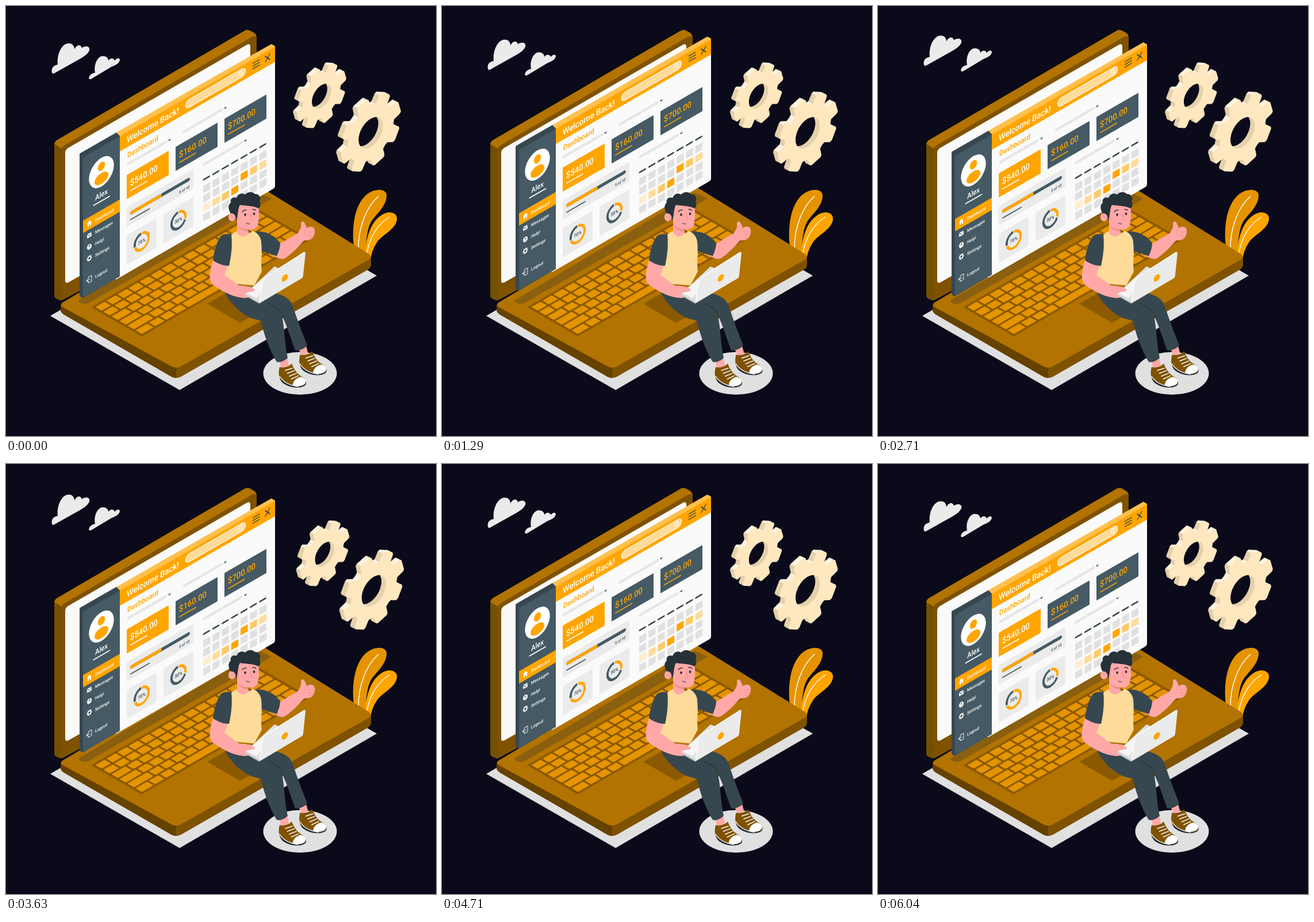
An HTML page that plays this animation: 748 by 748 pixels, repeating every 6080 ms.

```html
<!DOCTYPE html>
<html lang="en">
<head>
<meta charset="utf-8">
<title>Dashboard</title>
<style>
html, body { margin: 0; width: 100%; height: 100%; overflow: hidden; background: #0b0a1a; }
svg { display: block; width: 100vw; height: 100vh; }
text { font-family: Roboto, Inter, sans-serif; font-weight: 500; }
</style>
</head>
<body>
<svg id="stage" viewBox="0 0 748 748"></svg>
<script>
const NIGHT = '#0b0a1a', ORANGE = '#ffa500', SLATE = '#455a64', DARK = '#37474f', INK = '#263238';
const BROWN = '#b27300', BROWN_MID = '#8b5a00', BROWN_DARK = '#7f5200', BROWN_DEEP = '#664200';
const SKIN = '#ffa8a7', SKIN_DARK = '#f28f8f', GREY = '#e6e6e6', PAPER = '#fafafa';
const CREAM = '#ffe8bf', CREAM_LIGHT = '#fff3de', CREAM_DARK = '#e5d1ac';

const path = (d, fill) => `<path d="${d}" fill="${fill}"/>`;
const line = (d, color, w) =>
  `<path d="${d}" fill="none" stroke="${color}" stroke-width="${w}" stroke-linecap="round" stroke-linejoin="round"/>`;
const rect = (x, y, w, h, fill, r = 0) =>
  `<rect x="${x}" y="${y}" width="${w}" height="${h}" rx="${r}" fill="${fill}"/>`;
const oval = (x, y, rx, ry, fill) => `<ellipse cx="${x}" cy="${y}" rx="${rx}" ry="${ry}" fill="${fill}"/>`;
const group = (transform, body) => `<g transform="${transform}">${body}</g>`;
const layer = (id, body) => `<g id="${id}">${body}</g>`;
const times = (n, f) => Array.from({ length: n }, (_, i) => f(i)).join('');

// Text and round shapes on the upright plane keep their isometric proportions.
const iso = (x, y, body) => group(`translate(${x} ${y}) scale(.866 1)`, body);
const label = (x, y, size, fill, str, anchor = 'start') =>
  iso(x, y, `<text font-size="${size}" fill="${fill}" text-anchor="${anchor}">${str}</text>`);

function clouds() {
  return path('M80 116C78 108 83 103 90 102C88 86 96 65 109 65C116 65 119 70 119 75C123 67 130 66 132 73C138 68 147 70 145 77C143 84 132 90 125 94L84 117Q81 119 80 116Z', '#ebebeb') +
    path('M144 126C145 120 149 117 155 116C152 101 160 87 168 87C174 87 178 90 178 95C182 89 188 91 189 95C193 90 198 90 198 94C197 100 190 103 183 106L148 127Q145 128 144 126Z', '#ebebeb');
}

function plant() {
  return path('M606 428C600 385 606 350 624 331C640 315 664 317 662 331C661 349 645 361 636 374C628 386 626 410 625 436Z', '#e59400') +
    path('M624 438C625 405 634 378 650 366C664 354 682 358 680 372C677 389 656 397 646 410C640 419 636 428 634 440Z', ORANGE) +
    line('M613 426C612 384 628 348 648 331', '#fff', 1.4) +
    line('M627 436C631 402 648 378 667 367', '#fff', 1.4);
}

function lid() {
  return path('M84 241Q84 236 89 233L415 43Q420 40 425 43L432 47Q436 50 436 56V330L97 512Q92 512 88 509Q84 507 84 503Z', BROWN) +
    path('M84 240L97 248V512Q84 510 84 503Z', '#735000') +
    path('M97 512V250Q97 245 102 242L427 54Q436 49 436 58V325Z', BROWN_DARK) +
    path('M103 478V256Q103 250 108 247L418 68Q425 64 425 71V300L110 480Q103 484 103 478Z', PAPER);
}

function keyboard() {
  const first = [16, 16, 24, 28, 34, 20];
  const keys = times(6, r => {
    let out = '', x = 4, i = 0;
    while (x < 282) {
      let w = i === 0 ? first[r] : r === 5 && i === 4 ? 88 : 16;
      if (x + w > 270) w = 289 - x;
      out += rect(x, 3.5 + r * 14, w, 11, '#e59400', 1.2);
      x += w + 3.2;
      i++;
    }
    return out;
  });
  return group('matrix(1 -.577 1 .577 148 524)', rect(0, 0, 293, 88, BROWN_MID, 3) + keys);
}

function base() {
  return path('M95 520V529Q95 533 101 537L288 645Q296 649 304 645L629 459Q635 455 635 450V437L296 600Z', BROWN_DARK) +
    path('M95 520V529Q95 533 101 537L288 645Q292 647 296 647V610Z', BROWN_DEEP) +
    path('M98 516L432 318Q440 313 448 318L631 431Q638 437 630 442L304 627Q296 631 288 627L99 524Q93 520 98 516Z', BROWN) +
    path('M128 511L440 325L462 335L143 517Q136 520 129 516Q124 513 128 511Z', '#8a5f10') +
    keyboard() + path('M350 518L408 485L468 518L407 551Z', BROWN_MID);
}

function donut(x, share) {
  const arc = (from, size, color) =>
    `<circle r="14" fill="none" stroke="${color}" stroke-width="4.5" pathLength="100" stroke-dasharray="${size} 100" stroke-dashoffset="${-from}"/>`;
  return rect(x - 26, 406, 52, 51, '#ebebeb', 2.5) +
    iso(x, 431.5, group('rotate(-90)', arc(1, share - 2, ORANGE) + arc(share + 1, 98 - share, SLATE))) +
    label(x, 434.5, 8.3, DARK, share + '%', 'middle');
}

function sidebar() {
  const items = [['Dashboard', 351], ['Messages', 372], ['Help!', 392], ['Settings', 412], ['Logout', 449]];
  const icons = [
    path('M-5 0L0 -5L5 0H3.5V5H1V1.5H-1V5H-3.5V0Z', '#fff'),
    rect(-4.5, -3.5, 9, 7, '#fff', 1) + line('M-4 -2.5L0 1L4 -2.5', SLATE, 1),
    oval(0, 0, 4.6, 4.6, '#fff') + line('M-1.4 -1.2Q0 -3.5 1.5 -1.4Q1.3 -.4 0 .6M0 2.6V2.7', SLATE, 1.1),
    '<circle r="3" fill="none" stroke="#fff" stroke-width="1.8"/><circle r="4.3" fill="none" stroke="#fff" stroke-width="1.8" pathLength="16" stroke-dasharray="1 1"/>',
    line('M-2 -2V-5H4.5V5H-2V2M1 0H-5.5M-3.5 -2L-5.5 0L-3.5 2', '#fff', 1)
  ];
  return rect(134, 226.5, 64, 244, SLATE) +
    oval(166, 270.5, 21.7, 25, '#fff') + oval(166, 260.5, 6.2, 7.4, ORANGE) +
    oval(166, 281.5, 12, 9.5, ORANGE) +
    label(166, 314, 13, '#fff', 'Alex', 'middle') + line('M152.5 320.5H180', '#fff', 2) +
    rect(134, 336.5, 64, 21.5, ORANGE) +
    items.map(([str, y], i) => label(155, y, 7.8, '#fff', str) + iso(145, y - 3.8, icons[i])).join('');
}

function filterBar(x, y) {
  return line(`M${x + 3} ${y}H${x + 68}`, GREY, 5) +
    path(`M${x + 72} ${y - 1}h5l-2.5 3z`, DARK);
}

function calendar() {
  const tints = { '1,4': ORANGE, '1,5': '#ffc966', '1,6': '#ffdb99', '2,0': '#ffedcc', '2,1': '#ffdb99', '2,2': '#ffc966', '2,3': ORANGE };
  return times(7, c => line(`M${344 + c * 16.3} 386.3h9.5`, DARK, 3) +
    times(4, r => rect(343 + c * 16.3, 397 + r * 16.4, 12.2, 12.4, tints[r + ',' + c] || '#e0e0e0', .8)));
}

function panel() {
  const cards = [['$540.00', 210, ORANGE, '#fff'], ['$160.00', 295, SLATE, ORANGE], ['$700.00', 380, SLATE, ORANGE]];
  const face = rect(190, 228, 278, 244, PAPER, 3) + rect(198, 226.5, 270, 26.5, ORANGE) + sidebar() +
    label(210, 245.3, 15.2, '#fff', 'Welcome Back!') +
    `<rect x="312.5" y="232" width="104" height="14" rx="6.5" fill="#ffdb99" stroke="#fff" stroke-width="1.2"/>` +
    '<ellipse cx="408" cy="238" rx="2.8" ry="3.3" fill="none" stroke="#fff" stroke-width="1.1"/>' + line('M409.8 241L411.5 243.5', '#fff', 1.1) +
    times(3, i => line(`M429.5 ${233.5 + i * 4.7}H441`, DARK, 1.5)) +
    line('M451 233.5L459 243.5M459 233.5L451 243.5', DARK, 1.6) +
    label(211, 272, 12.8, ORANGE, 'Dashboard') +
    filterBar(210, 283) + filterBar(307, 283) + filterBar(342, 360) +
    cards.map(([sum, x, back, ink]) => rect(x, 301, 73, 42, back, 1) +
      label(x + 6, 324, 15, ink, sum) + line(`M${x + 7} 332H${x + 35}`, ink, 1.8)).join('') +
    rect(210, 357.5, 116, 34, '#ebebeb', 2.5) +
    line('M219 371H317', SLATE, 6) + line('M219 371H268', ORANGE, 6) +
    line('M217 382.5H249', SLATE, 2) + label(301, 386.5, 6.8, DARK, '5 of 10') +
    donut(236, 70) + donut(300, 30) + calendar();
  return path('M192 220L461 66.5Q463 66 468 70V74L198 229Z', '#ffc04d') +
    path('M128 258Q128 256 131 255L192 220L198 226V470L134 508Q128 507 128 502Z', DARK) +
    group('matrix(1 -.577 0 1 0 114.25)', face);
}

function shoe() {
  return path('M476 645C476 653 484 660 498 663C509 665 521 663 522 657V653Z', INK) +
    path('M476 628C473 640 475 648 480 651C490 660 506 663 518 660C524 656 522 650 515 645C506 640 501 632 497 622C492 628 482 630 476 628Z', BROWN_DARK) +
    path('M499 660C498 654 504 647 513 645C519 647 524 652 520 657C515 662 507 662 499 660Z', '#fff') +
    line('M476 644C482 654 494 660 508 662', '#fff', 1.3) +
    times(4, i => line(`M${486 + i * 3.4} ${634 + i * 5}L${498 + i * 3.6} ${630 + i * 4.4}`, '#fff', 1.4));
}

function man() {
  const legs = path('M473 612L479 630Q487 633 492 624L489 609Z', SKIN) + path('M507 593L514 607Q521 610 525 602L521 588Z', SKIN) +
    shoe() + group('translate(35.5 -21.5)', shoe()) +
    path('M436 512L470 500C486 504 496 511 500 525C508 550 518 575 524 590C520 596 511 600 503 599C495 578 487 550 478 535C465 524 450 522 436 512Z', DARK) +
    path('M377 486C382 510 400 527 420 540C432 546 440 545 444 549C449 575 462 605 471 619C477 621 485 617 490 612C484 585 485 560 480 540C475 527 458 520 445 515L425 490Z', DARK) +
    line('M455 517C472 523 479 530 481 541', INK, 1.2);
  const body = path('M465 432L474 415L508 395L519 407C508 420 496 432 485 439C478 442 468 437 460 430Z', SKIN) +
    path('M507 396C511 390 514 386 513 378C514 373 519 374 520 379C523 383 522 386 524 386C530 382 536 384 537 389C538 395 536 402 530 406C524 408 516 409 511 404Z', SKIN) +
    line('M522 387C519 390 518 394 520 396M525 393H536M525 398H536M526 403H533', SKIN_DARK, 1) +
    path('M424 392L448 393C460 396 470 404 477 412C477 420 474 428 471 435L443 426Z', DARK) +
    path('M387 402C394 395 400 392 404 391C410 400 425 398 428 391C438 394 443 402 444 410C446 430 443 450 445 462L432 486L381 482C376 475 376 470 378 455Z', '#ffdb99') +
    path('M360 442L386 450L380 468L405 486C418 487 432 489 434 494C434 500 426 505 418 508C400 508 381 500 360 485C353 479 353 466 360 442Z', SKIN) +
    path('M375 399C381 396 387 396 392 397C394 415 392 435 388 452C378 452 367 448 360 442C362 425 367 408 375 399Z', DARK);
  const head = path('M402 346L439 344C441 360 440 374 438 381C435 389 428 390 421 388L422 395C416 403 407 403 402 394Z', SKIN) +
    path('M402 379C407 386 414 388 421 388V392C412 392 405 387 402 379Z', SKIN_DARK) +
    oval(393, 367, 6.2, 7.6, SKIN) + line('M390 365Q395 365 396 370', SKIN_DARK, 1) +
    path('M401 374C400 364 396 360 391 361C386 353 386 346 391 342C389 335 396 331 401 334C404 325 412 325 416 328C421 322 430 323 433 327C440 326 445 334 441 340C444 346 442 350 439 352C430 347 418 348 407 346C404 351 404 357 403 363Z', INK) +
    oval(416, 363, 1.8, 2.3, INK) + oval(431.5, 361.5, 1.8, 2.3, INK) +
    line('M411 358Q414 354 418 355M429 354Q433 353 435 356', INK, 1.3) +
    line('M424 362C426 366 429 369 428 371L424 372', SKIN_DARK, 1.2) +
    line('M418 377.5Q421 380 424 379', INK, 1);
  const laptop = path('M416 501L441 517L474 456L467 453Z', '#e0e0e0') + path('M418 499L436 508L470 464L450 472Z', '#f5f5f5') +
    path('M441 515Q440 518 443 516L514 474Q517 472 517 468L521 430Q521 426 517 429L451 471Q447 474 446 478Z', '#ebebeb') +
    line('M441 516L447 477Q448 474 452 471L518 429', '#fafafa', 1.6) +
    path('M416 501L441 515V518L418 505Z', '#c7c7c7') +
    group('matrix(.866 -.5 0 1 485 473)', oval(0, 0, 6.3, 5.8, ORANGE)) +
    path('M408 489C419 488 432 490 433 494C432 498 423 497 416 499Z', SKIN);
  return legs + body + head + laptop;
}

function gear(cx, cy, R, hole, dx, dy) {
  const pts = [];
  const add = (a, r) => pts.push([cx + .866 * r * Math.cos(a), cy + r * (Math.sin(a) - .5 * Math.cos(a))]);
  for (let i = 0; i < 8; i++) {
    const a = (i * 45 - 16) * Math.PI / 180;
    add(a - .27, R * .77); add(a - .2, R * .97); add(a - .15, R);
    add(a + .15, R); add(a + .2, R * .97); add(a + .27, R * .77);
    add(a + .39, R * .75);
  }
  // Only edges turned towards the back offset show a side face.
  const sides = pts.map((p, i) => {
    const q = pts[(i + 1) % pts.length];
    const nx = q[1] - p[1], ny = p[0] - q[0];
    if (nx * dx + ny * dy <= 0) return '';
    const tone = -ny > Math.abs(nx) * .45 ? CREAM_LIGHT : CREAM_DARK;
    return `<path d="M${p}L${q}l${dx} ${dy}L${p[0] + dx} ${p[1] + dy}Z" fill="${tone}" stroke="${tone}" stroke-width=".6"/>`;
  }).join('');
  const disc = (x, y, fill) => group(`matrix(.866 -.5 0 1 ${x} ${y})`, oval(0, 0, hole, hole, fill));
  const id = 'hole' + cx;
  return `<clipPath id="${id}"><ellipse rx="${hole}" ry="${hole}" transform="matrix(.866 -.5 0 1 ${cx} ${cy})"/></clipPath>` +
    sides + `<path d="M${pts.join('L')}Z" fill="${CREAM}" stroke="${CREAM}" stroke-linejoin="round"/>` +
    disc(cx, cy, CREAM_DARK) + `<g clip-path="url(#${id})">${disc(cx + dx, cy + dy, NIGHT)}</g>`;
}

const stage = document.getElementById('stage');
stage.innerHTML =
  path('M77 539L302 668L645 469L420 340Z', '#e0e0e0') +
  layer('clouds', clouds()) + plant() + lid() + base() +
  layer('panel', panel()) +
  oval(511.5, 639, 64, 37, '#e0e0e0') + man() +
  layer('gears', gear(549, 157, 49.5, 19.5, -7, -3.5) + gear(634.5, 220.5, 60.5, 24.5, -8, -4));

const SHAKE = [0, -1.5, 3, -6, 6, -6, 6, -6, 3, -1.5, 0];

// Triangle wave: 0 to 1 and back within one period.
const bounce = (t, period) => 1 - Math.abs(1 - 2 * (t % period) / period);

function shake(t) {
  const k = t % 6000 / 600, i = Math.floor(k);
  return SHAKE[i] + (SHAKE[i + 1] - SHAKE[i]) * (k - i);
}

const move = (id, x, y) => document.getElementById(id).setAttribute('transform', `translate(${x} ${y})`);

function draw(now) {
  const t = now % 6080;
  move('clouds', 0, -15 * bounce(t, 6000));
  move('panel', 0, -15 * bounce(t, 3000));
  move('gears', shake(t), 0);
}

let start;
function tick(now) {
  start ??= now;
  draw(now - start);
  requestAnimationFrame(tick);
}
draw(0);
requestAnimationFrame(tick);
</script>
</body>
</html>
```
